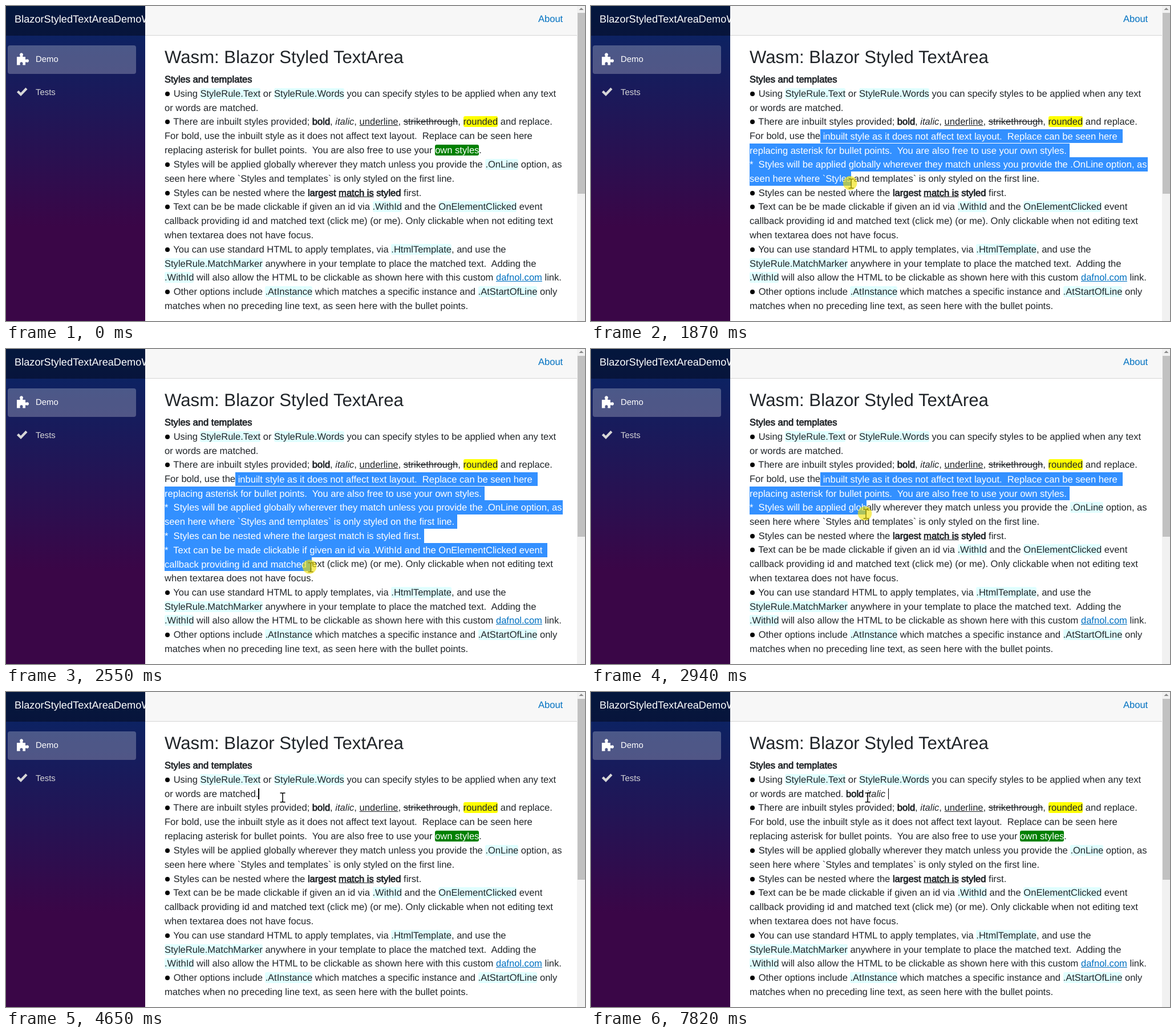
An HTML page that plays this animation: 1015x552 px, repeating every 8 s.

```html
<!DOCTYPE html>
<html lang="en">
<head>
<meta charset="utf-8">
<title>Styled text area</title>
<style>
html, body { margin: 0; width: 100%; height: 100%; overflow: hidden; background: #fff; }
body {
  position: relative; color: #212529;
  font: 16.55px/24.82px "Liberation Sans", Arial, sans-serif;
  text-rendering: geometricPrecision; white-space: pre;
}
nav, header, h2, #page, .bar, .thumb, nav *, header a, #sel div, svg { position: absolute; }
nav { left: 0; top: 0; width: 244px; height: 552px; overflow: hidden; color: #d7d7d7; font-size: 14.9px;
  background: linear-gradient(#052767, #3a0647 70%) 0 -6px / 100% 560px; }
.brand { left: 0; top: 0; width: 230px; height: 52px; padding-left: 15px; line-height: 46.4px;
  font-size: 18.2px; color: #fff; background: rgba(0,0,0,.4); }
.active { left: 3px; top: 69px; width: 225px; height: 49.5px; border-radius: 4px; background: rgba(255,255,255,.25); }
.item { left: 52px; line-height: 24px; }
header { left: 244px; top: 0; width: 757px; height: 51px; background: #f7f7f7; border-bottom: 1px solid #d6d5d5; }
header a { left: 689px; top: 11.2px; }
a { color: #0071c1; }
h2 { left: 278px; top: 70.7px; margin: 0; font-size: 31.15px; font-weight: 400; line-height: 37.27px; }
#page { left: 278px; top: 117.05px; }
#page > div { height: 24.82px; }
b { font-weight: 400; -webkit-text-stroke: .75px; }
code, mark, em { font: inherit; color: inherit; border-radius: 3px; }
code { background: #e0ffff; }
mark { background: #ff0; }
em { background: green; color: #fff; }
a.link { text-decoration: underline; }
.dot { position: relative; color: transparent; }
.dot::before { content: ""; position: absolute; left: 1px; top: 6px; width: 8px; height: 8px; border-radius: 50%; background: #000; }
.caret { position: absolute; width: 1.5px; height: 19px; margin-top: 2.5px; background: #000; }
#sel div { height: 24.82px; line-height: 26.12px; overflow: hidden; background: #3390ff; color: #fff; }
.bar { left: 1001px; top: 0; width: 14px; height: 552px; background: #f1f1f1; }
.thumb { left: 1002px; top: 12px; width: 13px; height: 317px; background: #c1c1c1; }
svg { left: 0; top: 0; }
</style>
</head>
<body>
<nav>
  <div class="brand">BlazorStyledTextAreaDemoWasm</div>
  <div class="active"></div>
  <div class="item" style="top:82px;color:#fff">Demo</div>
  <div class="item" style="top:140px">Tests</div>
  <svg width="60" height="170">
    <path fill="#fff" d="M19 89h5c1 0 1-1 .5-2a3 3 0 1 1 5 0c-.5 1-.5 2 .5 2h4v4c0 1 1 1 2 .5a2.8 2.8 0 1 1 0 5c-1-.5-2-.5-2 .5v4.500h-4c-1 0-1-1-.5-2a2.600 2.600 0 1 0-5 0c.5 1 .5 2-.5 2h-5z"/>
    <path fill="none" stroke="#d7d7d7" stroke-width="4.300" d="M20.500 149.500l5.500 5.500 10-10.500"/>
  </svg>
</nav>
<header><a>About</a></header>
<h2>Wasm: Blazor Styled TextArea</h2>
<div id="page"></div>
<div id="sel"></div>
<div class="bar"></div>
<div class="thumb"></div>
<svg width="1015" height="552">
  <path fill="#8a8a8a" d="M1004.500 7l4-4 4 4z"/>
  <g id="cursor">
    <path fill="none" stroke="#000" stroke-width="1.500" d="M-4.500-8h3.500l1 1 1-1h3.500M0-7v14M-4.500 8h3.500l1-1 1 1h3.500"/>
    <circle id="press" cx="-2" cy="-1" r="12.300" fill="rgba(240,225,0,.62)"/>
  </g>
</svg>
<script>
const LOOP = 8000, LEFT = 278, RIGHT = 976, TOP = 116.4, ROW = 24.82;
const $ = id => document.getElementById(id);

const lines = `Styles and templates
*  Using StyleRule.Text or StyleRule.Words you can specify styles to be applied when any text
or words are matched.
*  There are inbuilt styles provided; bold, italic, underline, strikethrough, rounded and replace.
For bold, use the inbuilt style as it does not affect text layout.  Replace can be seen here
replacing asterisk for bullet points.  You are also free to use your own styles.
*  Styles will be applied globally wherever they match unless you provide the .OnLine option, as
seen here where \`Styles and templates\` is only styled on the first line.
*  Styles can be nested where the largest match is styled first.
*  Text can be be made clickable if given an id via .WithId and the OnElementClicked event
callback providing id and matched text (click me) (or me). Only clickable when not editing text
when textarea does not have focus.
*  You can use standard HTML to apply templates, via .HtmlTemplate, and use the
StyleRule.MatchMarker anywhere in your template to place the matched text.  Adding the
.WithId will also allow the HTML to be clickable as shown here with this custom dafnol.com link.
*  Other options include .AtInstance which matches a specific instance and .AtStartOfLine only
matches when no preceding line text, as seen here with the bullet points.`.split("\n");

const rules = [
  [/StyleRule\.\w+|\.(OnLine|WithId|HtmlTemplate|At\w+)|OnElementClicked/g, "<code>$&</code>"],
  [/^Styles and templates|largest match is styled|(?<!For )bold/g, "<b>$&</b>"],
  [/match is|underline/g, "<u>$&</u>"],
  [/italic/g, "<i>$&</i>"],
  [/strikethrough/g, "<s>$&</s>"],
  [/rounded/g, "<mark>$&</mark>"],
  [/own styles/g, "<em>$&</em>"],
  [/dafnol\.com/g, '<a class="link">$&</a>'],
  [/^\*  /, '<span class="dot">$&</span>']
];
const styled = text => rules.reduce((s, [re, tag]) => s.replace(re, tag), text);

$("page").innerHTML = lines.map(l => `<div>${styled(l)}</div>`).join("");
const typedRow = 2, typedLine = $("page").children[typedRow];

const pen = document.createElement("canvas").getContext("2d");
pen.font = '16.55px "Liberation Sans", Arial, sans-serif';
pen.textRendering = "geometricPrecision";
const width = text => pen.measureText(text).width;

// Each mouse move is a curve run in even steps from where the last one ended.
const moves = [
  { start: 460, end: 780, steps: 5, bend: [640, 360], to: [496, 338] },
  { start: 1010, end: 1330, steps: 5, bend: [450, 270], to: [404, 220] },
  { start: 1560, end: 1630, steps: 2, bend: [404, 222], to: [403, 225] },
  { start: 1790, end: 2170, steps: 6, bend: [487, 375], to: [545, 402] },
  { start: 2550, end: 2940, steps: 6, bend: [512, 343], to: [482, 289] },
  { start: 3580, end: 4170, steps: 9, bend: [557, 240], to: [485, 185] }
];
const [, , press, dragDown, dragUp] = moves;
const release = 3180, click = 4400, clickEnd = 4650, blink = 540;

function mouse(t) {
  let at = [1160, 620];
  for (const { start, end, steps, bend, to } of moves) {
    if (t < start) break;
    const step = 1 + Math.floor((t - start) / (end - start) * (steps - 1) + 0.01);
    const u = Math.min(1, step / steps), v = 1 - u;
    at = at.map((p, i) => v * v * p + 2 * u * v * bend[i] + u * u * to[i]);
  }
  return at;
}

const firstRow = 4, firstX = LEFT + width("For bold, use the");

// Nearest gap between letters
function snap(text, x) {
  let best = LEFT;
  for (let n = 1; n <= text.length; n++) {
    const gap = LEFT + width(text.slice(0, n));
    if (Math.abs(gap - x) < Math.abs(best - x)) best = gap;
  }
  return best;
}

function rowEnd(row) {
  const wrapped = !lines[row + 1].startsWith("*");
  return Math.min(RIGHT, LEFT + width(lines[row] + (wrapped ? "  " : " ")));
}

function selection(t) {
  if (t < dragDown.start || t >= click) return "";
  const [x, y] = mouse(Math.min(t, dragUp.end));
  const lastRow = Math.floor((y - TOP) / ROW);
  let html = "";
  for (let row = firstRow; row <= lastRow; row++) {
    const x0 = row === firstRow ? firstX : LEFT;
    const x1 = row === lastRow ? snap(lines[row], x) : rowEnd(row);
    html += `<div style="left:${x0}px;top:${TOP + row * ROW}px;width:${x1 - x0}px;text-indent:${LEFT - x0}px">${lines[row]}</div>`;
  }
  return html;
}

// Bursts of typing: start, gap between keys, text
const bursts = [[5270, 230, " bol"], [6040, 230, "d "], [6530, 60, "it"], [7280, 103, "alic"], [7820, 0, " "]];

function typing(t) {
  let text = "", last = click;
  for (const [start, gap, chars] of bursts)
    [...chars].forEach((c, i) => {
      if (t < start + i * gap) return;
      text += c;
      last = start + i * gap;
    });
  const lit = t >= click && (t - last) % (2 * blink) < blink;
  return styled(lines[typedRow] + text) + (lit ? '<span class="caret"></span>' : "");
}

function update(el, html) {
  if (el.shown !== html) el.innerHTML = el.shown = html;
}

function draw() {
  const t = performance.now() % LOOP;
  update($("sel"), selection(t));
  update(typedLine, typing(t));
  $("cursor").setAttribute("transform", `translate(${mouse(t)})`);
  const pressed = t >= press.start && t < release || t >= click && t < clickEnd;
  $("press").style.display = pressed ? "" : "none";
  requestAnimationFrame(draw);
}
draw();
</script>
</body>
</html>
```
